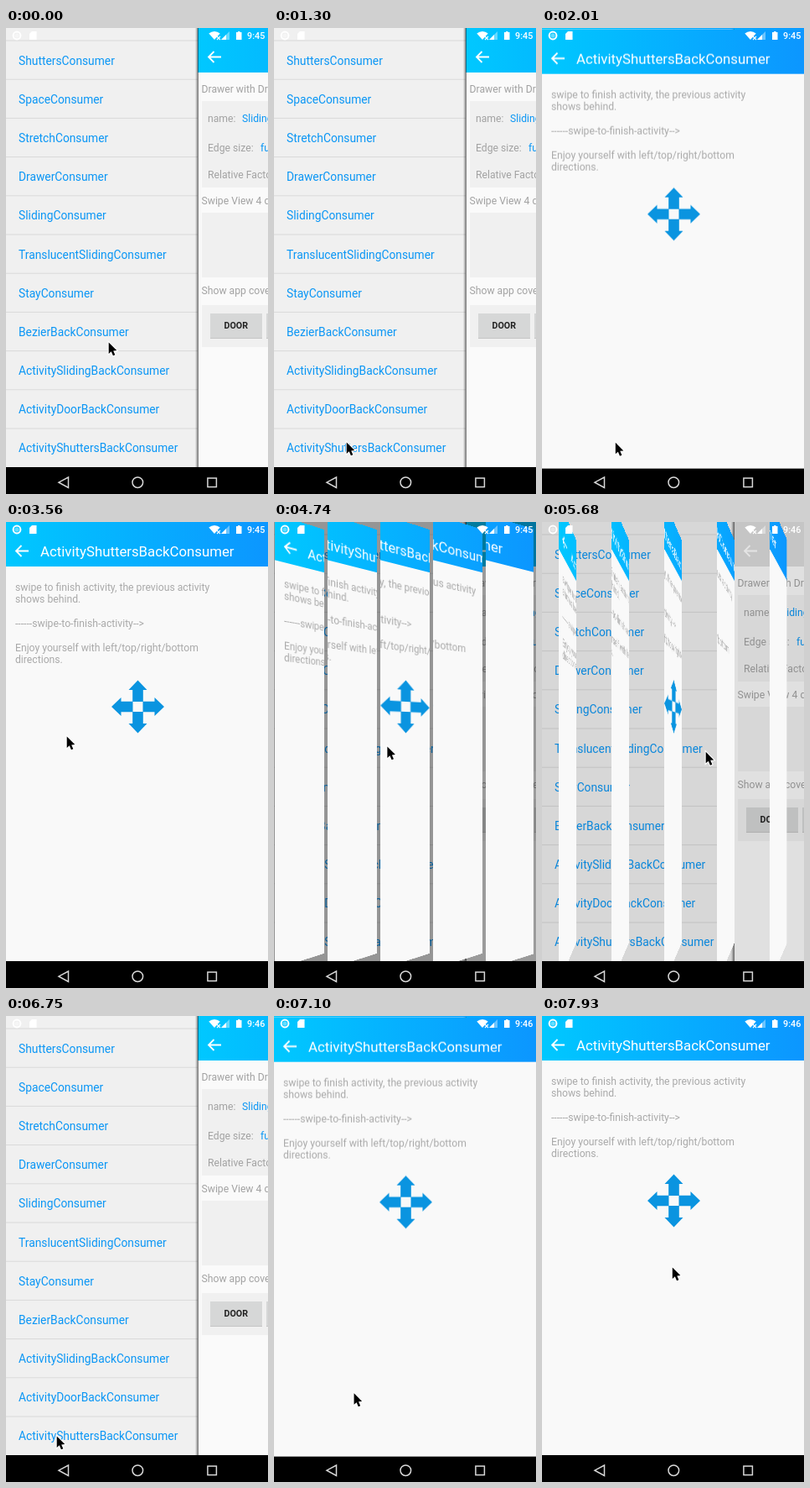
Write an HTML page with a canvas that moves like this. It is 313 px wide and 555 px high and loops after 8 s.

```html
<!DOCTYPE html>
<html lang="en">
<head>
<meta charset="utf-8">
<title>Shutters back demo</title>
<style>
html, body { margin: 0; width: 100%; height: 100%; overflow: hidden; background: #000; }
canvas { display: block; width: 313px; height: 555px; }
</style>
</head>
<body>
<canvas id="stage"></canvas>
<script>
const W = 313, H = 555, NAV = 523, DRAWER = 229;
const LOOP = 8000, TICK = 118.35;
const LEAVES = 5, DEPTH = 330;
const BLUE = '#0a96f5', GREY = '#a2a2a2';
const OPENINGS = [1857, 6946], RELEASE = 5450, CLOSED = 5880;
const dpr = window.devicePixelRatio || 1;

function setup(canvas) {
  canvas.width = W * dpr;
  canvas.height = H * dpr;
  const c = canvas.getContext('2d');
  c.scale(dpr, dpr);
  c.imageSmoothingQuality = 'high';
  return c;
}
const ctx = setup(document.getElementById('stage'));
const page = document.createElement('canvas');

function rect(c, color, x, y, w, h) {
  c.fillStyle = color;
  c.fillRect(x, y, w, h);
}
function text(c, str, x, y, size, color, weight = 400) {
  c.font = `${weight} ${size}px Roboto, sans-serif`;
  c.fillStyle = color;
  c.fillText(str, x, y);
}
function trace(c, points, closed) {
  c.beginPath();
  points.forEach(([x, y]) => c.lineTo(x, y));
  if (closed) c.closePath();
}
function backArrow(c, x, color) {
  c.strokeStyle = color;
  c.lineWidth = 1.8;
  trace(c, [[x + 7.5, 28], [x + 1, 34.5], [x + 7.5, 41]]);
  c.moveTo(x + 1, 34.5);
  c.lineTo(x + 16, 34.5);
  c.stroke();
}
function headerFill(c, x) {
  const g = c.createLinearGradient(x, 0, x + W, 0);
  g.addColorStop(0, '#00c8ff');
  g.addColorStop(1, '#0c96ff');
  return g;
}

function drawPage(c) {
  rect(c, '#f9f9f9', 0, 0, W, NAV);
  rect(c, headerFill(c, 0), 0, 0, W, 53);
  backArrow(c, 11, '#fff');
  text(c, 'ActivityShuttersBackConsumer', 41, 41, 16.8, '#fff');
  ['swipe to finish activity, the previous activity', 'shows behind.', '',
    '------swipe-to-finish-activity-->', '',
    'Enjoy yourself with left/top/right/bottom', 'directions.'
  ].forEach((line, i) => text(c, line, 11, 81.5 + i * 14.4, 12.2, '#a9a9a9'));
  c.save();
  c.translate(157.5, 220);
  c.fillStyle = '#0a94e0';
  for (let i = 0; i < 4; i++) {
    trace(c, [[6, -6.3], [20, -6.3], [20, -11], [31.5, 0], [20, 11], [20, 6.3], [6, 6.3]], true);
    c.fill();
    c.rotate(Math.PI / 2);
  }
  c.restore();
}

const ITEMS = ['Shutters', 'Space', 'Stretch', 'Drawer', 'Sliding', 'TranslucentSliding', 'Stay',
  'BezierBack', 'ActivitySlidingBack', 'ActivityDoorBack', 'ActivityShuttersBack'];

function drawList(c, greyHeader) {
  rect(c, '#fafafa', 0, 0, W, NAV);
  rect(c, greyHeader ? '#dcdcdc' : headerFill(c, DRAWER), DRAWER, 0, W - DRAWER, 53);
  backArrow(c, 241, '#fff');
  for (const [y, h] of [[87, 103], [220, 77], [330, 50]]) rect(c, '#f0f0f0', 234, y, W - 234, h);
  const label = (str, x, y, color = GREY) => text(c, str, x, y, 12.2, color);
  label('Drawer with DrawerConsumer', 233.5, 77);
  label('name:', 241, 112);
  label('SlidingConsumer', 282, 112, BLUE);
  label('Edge size:', 241, 147);
  label('full', 304, 147, BLUE);
  label('Relative Factor:', 241, 179);
  label('Swipe View 4 directions', 233.5, 210);
  label('Show app cover', 233.5, 317);
  for (const x of [244, 311]) {
    rect(c, '#c4c4c4', x, 341, 62, 29);
    rect(c, '#d6d7d7', x, 340, 62, 29);
  }
  text(c, 'DOOR', 260.5, 358, 10.7, '#222', 600);

  rect(c, '#f0f0f0', 0, 0, DRAWER, NAV);
  ITEMS.forEach((name, i) => {
    rect(c, '#dadada', 0, 14.5 + i * 46.2, DRAWER, 1);
    text(c, name + 'Consumer', 15, 43.85 + i * 46.14, 13.8, BLUE);
  });
  const shadow = c.createLinearGradient(DRAWER - 3, 0, DRAWER + 1, 0);
  shadow.addColorStop(0, 'rgba(0,0,0,0)');
  shadow.addColorStop(1, 'rgba(0,0,0,.55)');
  rect(c, shadow, DRAWER - 3, 0, 4, NAV);
}

// Each leaf turns about its own vertical axis, right side away from the viewer.
function drawShutters(c, angle) {
  const sin = Math.sin(angle), cos = Math.cos(angle), w = Math.ceil(W / LEAVES), half = w / 2;
  const project = u => u * cos * DEPTH / (DEPTH + u * sin);
  c.save();
  c.beginPath();
  c.rect(0, 0, W, NAV);
  c.clip();
  for (let i = 0; i < LEAVES; i++) {
    const axis = (i + .5) * w;
    const end = Math.round(axis + project(half));
    for (let x = Math.round(axis + project(-half)); x < end; x++) {
      const at = dx => dx * DEPTH / (cos * DEPTH - dx * sin);
      const u0 = Math.max(-half, at(x - axis)), u1 = Math.min(half, at(x + 1 - axis));
      const h = NAV * DEPTH / (DEPTH + (u0 + u1) / 2 * sin);
      if (u1 > u0) c.drawImage(page, (axis + u0) * dpr, 0, (u1 - u0) * dpr, NAV * dpr, x, (NAV - h) / 2, 1, h);
    }
  }
  c.restore();
}

function drawStatus(c, clock) {
  c.strokeStyle = c.fillStyle = '#fff';
  c.lineWidth = 2;
  c.beginPath();
  c.arc(13, 9, 4.4, 0, 7);
  c.stroke();
  c.globalAlpha = .4;
  c.beginPath();
  c.arc(13, 9, 2.6, 0, 7);
  c.fill();
  trace(c, [[257, 14], [267, 4], [267, 14]], true);
  c.fill();
  c.globalAlpha = 1;
  trace(c, [[28, 7], [31, 4], [36.5, 4], [36.5, 14], [28, 14]], true);
  c.fill();
  trace(c, [[257, 14], [263, 8], [263, 14]], true);
  c.fill();
  c.beginPath();
  c.moveTo(249, 14);
  c.arc(249, 14, 10, -2.3, -.84);
  c.fill();
  c.lineWidth = 1.1;
  trace(c, [[252, 10], [256, 14]]);
  c.moveTo(256, 10);
  c.lineTo(252, 14);
  c.stroke();
  c.fillRect(275, 5, 6.5, 9);
  c.fillRect(277, 4, 2.5, 1);
  text(c, clock, 288, 13, 10.8, '#fff', 500);
}

function drawNav(c) {
  c.strokeStyle = '#d8d8d8';
  c.lineWidth = 1.5;
  trace(c, [[74.5, 535], [74.5, 547.5], [63, 541.2]], true);
  c.stroke();
  c.beginPath();
  c.arc(157.3, 541.2, 6.3, 0, 7);
  c.stroke();
  c.strokeRect(240.9, 536.1, 10.5, 10.5);
}

function drawCursor(c, [x, y]) {
  c.save();
  c.translate(x + .7, y + .5);
  c.scale(.93, .93);
  trace(c, [[0, 0], [0, 14.5], [3.3, 11.6], [5.6, 17], [8.2, 15.9], [5.9, 10.7], [10.3, 10.3]], true);
  c.strokeStyle = '#fff';
  c.lineWidth = 2.3;
  c.stroke();
  c.fillStyle = '#000';
  c.fill();
  c.restore();
}

// Pointer path: time, x, y.
const PATH = [[0, 122, 374], [110, 122, 374], [830, 66, 452], [900, 67, 452], [1300, 86, 493],
  [1660, 87, 494], [2010, 87, 494], [2600, 112, 304], [2900, 90, 192], [3200, 68, 246],
  [3440, 72, 255], [3560, 72, 255], [4740, 135, 267], [5450, 195, 273], [6070, 195, 274],
  [6740, 60, 500], [6900, 60, 500], [7690, 197, 299], [7930, 155, 299], [LOOP, 155, 299]];

function pointer(t) {
  const i = PATH.findIndex(p => p[0] > t);
  const [t0, x0, y0] = PATH[i - 1], [t1, x1, y1] = PATH[i];
  const k = (t - t0) / (t1 - t0);
  return [x0 + (x1 - x0) * k, y0 + (y1 - y0) * k];
}

// Swipe progress from 0 (shut) to 1 (edge-on): dragged, then released.
function swipe(t, x) {
  if (t < 3560 || t >= OPENINGS[1]) return 0;
  const dragged = px => Math.max(0, (px - 87) * .455 / 90);
  if (t < RELEASE) return dragged(x);
  const from = dragged(195);
  return Math.min(1, from + (1 - from) * (t - RELEASE) / (CLOSED - RELEASE));
}

function render(t) {
  const pos = pointer(t), progress = swipe(t, pos[0]);
  const turning = progress > 0 && progress < 1;
  rect(ctx, '#000', 0, 0, W, H);
  drawList(ctx, turning && progress > .4);
  rect(ctx, '#000', 0, NAV, W, H - NAV);

  const opened = t - (t < OPENINGS[1] ? OPENINGS[0] : OPENINGS[1]);
  if (turning) {
    rect(ctx, `rgba(0,0,0,${.5 * (1 - progress)})`, 0, 0, W, NAV);
    drawShutters(ctx, progress * Math.PI / 2);
  } else if (opened >= 0 && progress === 0) {
    const drop = 46 * Math.pow(1 - Math.min(1, opened / 320), 5);
    ctx.globalAlpha = Math.min(1, opened / 155);
    rect(ctx, headerFill(ctx, 0), 0, 0, W, drop);
    ctx.drawImage(page, 0, 0, W * dpr, NAV * dpr, 0, drop, W, NAV);
    ctx.globalAlpha = 1;
  }
  drawStatus(ctx, t < 5090 ? '9:45' : '9:46');
  drawNav(ctx);
  drawCursor(ctx, pos);
}

drawPage(setup(page));
function frame() {
  const t = performance.now() % LOOP;
  render(Math.floor((t + 5) / TICK) * TICK);
  requestAnimationFrame(frame);
}
frame();
</script>
</body>
</html>
```
